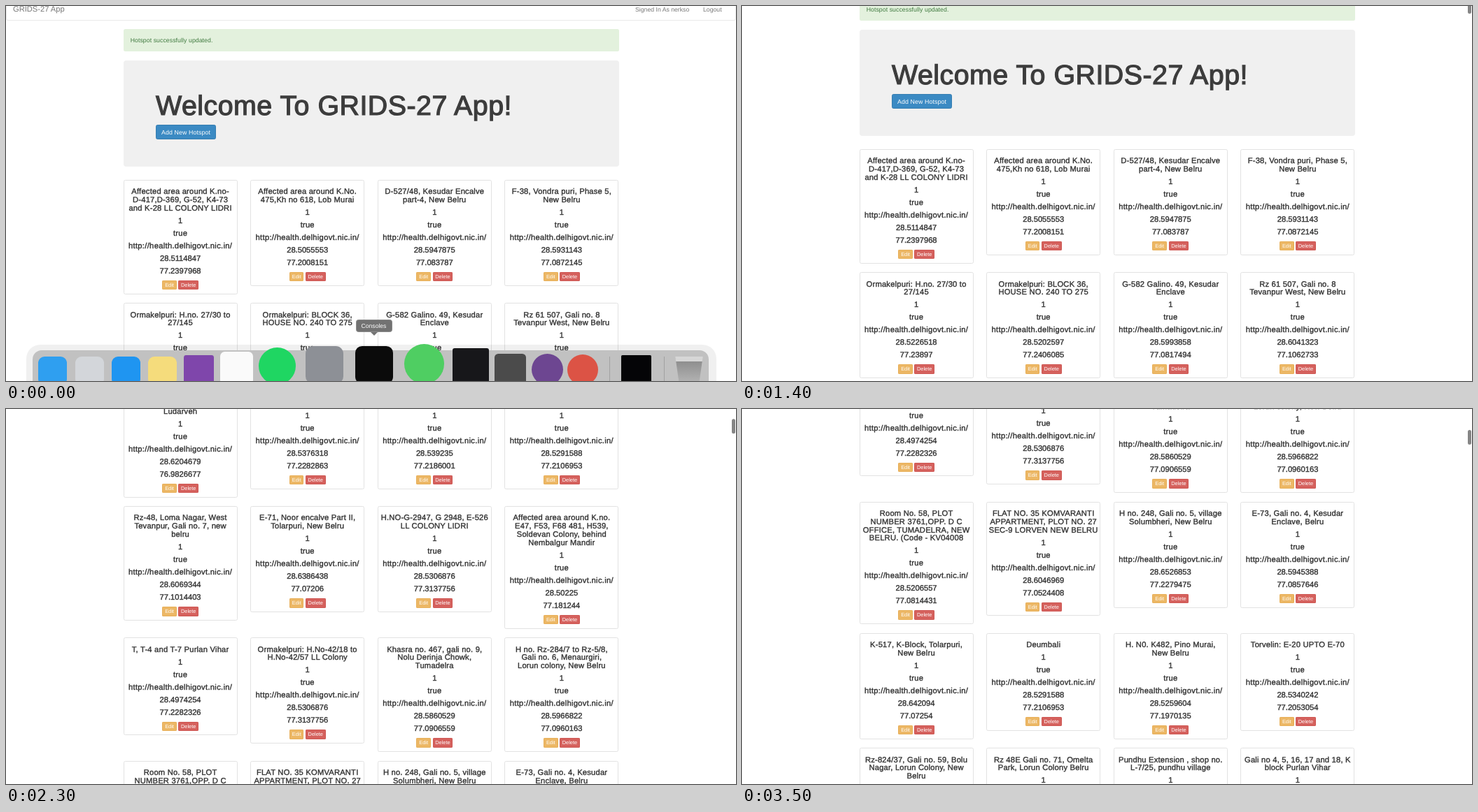
These frames come from a looping animation (1043x537 px, 3.6 s). An HTML page:

```html
<!DOCTYPE html>
<html lang="en">
<head>
<meta charset="utf-8">
<title>Hotspots</title>
<style>
  html, body { margin: 0; width: 100%; height: 100%; overflow: hidden; background: #fff; }
  body { font-family: "Liberation Sans", Arial, sans-serif; text-rendering: geometricPrecision; color: #333; }
  #stage { position: relative; width: 1043px; height: 537px; overflow: hidden; background: #fff; }
  #stage * { box-sizing: border-box; white-space: nowrap; }
  #page { position: absolute; inset: 0; }
  #page > * { position: absolute; }
  .nav { left: 0; top: -12px; width: 1043px; height: 33px; border: 1px solid #e9e9e9; border-radius: 3px; }
  .nav span { position: absolute; top: 10px; line-height: 12px; font-size: 8.7px; color: #777; }
  .nav .brand { left: 9px; font-size: 11.15px; }
  .alert { left: 168px; top: 33px; width: 707.5px; height: 32px; padding-left: 9.7px; border-radius: 2.5px;
    background: #e3f1dd; color: #3f793f; font-size: 8.7px; line-height: 32.5px; letter-spacing: .08px; }
  .hero { left: 168px; top: 78px; width: 707.5px; height: 152px; border-radius: 4px; background: #f0f0f0; }
  .hero h1 { position: absolute; left: 46px; top: 43px; margin: 0; font-size: 39.4px; font-weight: 400; line-height: 45px;
    letter-spacing: .47px; color: #3c3c3c; -webkit-text-stroke: 1.2px; }
  .hero b { position: absolute; left: 46px; top: 91.5px; width: 86px; height: 21.5px; border-radius: 2.5px; border: 1px solid #357db0;
    background: #3b8ac3; color: #fff; font-size: 8.8px; font-weight: 400; line-height: 20px; text-align: center; letter-spacing: .1px; }
  .grid { left: 167.6px; top: 248.8px; display: grid; grid-template-columns: repeat(4, 163px);
    column-gap: 18.6px; row-gap: 12.45px; align-items: start; }
  .card { padding: 11.4px 0 5.4px; border: 1px solid #e2e2e2; border-radius: 2.5px; text-align: center; }
  .card h4 { margin: 0 0 6.15px; font-size: 11.17px; font-weight: 400; line-height: 11.85px;
    letter-spacing: .22px; -webkit-text-stroke: .38px; }
  .card .url { letter-spacing: .32px; }
  .card .num { letter-spacing: 0; }
  .acts { display: flex; justify-content: center; gap: 2.7px; height: 13.5px; }
  .acts span { width: 20.5px; border-radius: 2px; background: #ecb765; box-shadow: inset 0 0 0 .6px #e5a94f;
    color: #fff; font-size: 7.4px; line-height: 13.5px; }
  .acts span + span { width: 28.5px; background: #d5615d; box-shadow: inset 0 0 0 .6px #c94f4b; }
  #thumb { position: absolute; left: 1037px; top: 0; width: 5px; height: 21px; border-radius: 2.5px; background: #858585; }
  #dock { position: absolute; inset: 0; }
  #dock > * { position: absolute; }
  .halo { top: 485px; height: 60px; border-radius: 20px 20px 0 0; background: rgba(0,0,0,.06); }
  .bar { top: 493px; height: 60px; border-radius: 13px 13px 0 0; background: #c1c1c1; }
  .sep { top: 502px; width: 1px; height: 40px; background: #a2a2a2; }
  .bin { clip-path: polygon(2% 0, 98% 0, 84% 100%, 16% 100%); background: linear-gradient(#d6d6d6 18%, #8f8f8f 18%, #b8b8b8); }
  #tip { width: 52px; height: 18px; border-radius: 3.5px; background: #727272; border: 1px solid #8b8b8b;
    color: #fff; font-size: 8.6px; line-height: 16.5px; text-align: center; }
  #tip::after { content: ""; position: absolute; left: 20px; top: 17px; border: 5px solid transparent; border-top-color: #727272; border-bottom: 0; }
</style>
</head>
<body>
<div id="stage">
  <div id="page">
    <div class="nav">
      <span class="brand">GRIDS-27 App</span>
      <span style="left:898px">Signed In As nerkso</span>
      <span style="left:995px">Logout</span>
    </div>
    <div class="alert">Hotspot successfully updated.</div>
    <div class="hero"><h1>Welcome To GRIDS-27 App!</h1><b>Add New Hotspot</b></div>
    <div class="grid"></div>
  </div>
  <div id="thumb"></div>
  <div id="dock"></div>
</div>
<script>
// title lines; latitude; longitude
const places = `
Affected area around K.no-|D-417,D-369, G-52, K4-73|and K-28 LL COLONY LIDRI;28.5114847;77.2397968
Affected area around K.No.|475,Kh no 618, Lob Murai;28.5055553;77.2008151
D-527/48, Kesudar Encalve|part-4, New Belru;28.5947875;77.083787
F-38, Vondra puri, Phase 5,|New Belru;28.5931143;77.0872145
Ormakelpuri: H.no. 27/30 to|27/145;28.5226518;77.23897
Ormakelpuri: BLOCK 36,|HOUSE NO. 240 TO 275;28.5202597;77.2406085
G-582 Galino. 49, Kesudar|Enclave;28.5993858;77.0817494
Rz 61 507, Gali no. 8|Tevanpur West, New Belru;28.6041323;77.1062733
H No. E-4, New Sorva Park,|Ludarveh;28.6204679;76.9826677
Nirup Belru;28.5376318;77.2282863
KOLARTI NAGAR;28.539235;77.2186001
DEUMBALI EXTENDED;28.5291588;77.2106953
Rz-48, Loma Nagar, West|Tevanpur, Gali no. 7, new|belru;28.6069344;77.1014403
E-71, Noor encalve Part II,|Tolarpuri, New Belru;28.6386438;77.07206
H.NO-G-2947, G 2948, E-526|LL COLONY LIDRI;28.5306876;77.3137756
Affected area around K.no.|E47, F53, F68 481, H539,|Soldevan Colony, behind|Nembalgur Mandir;28.50225;77.181244
T, T-4 and T-7 Purlan Vihar;28.4974254;77.2282326
Ormakelpuri: H.No-42/18 to|H.No-42/57 LL Colony;28.5306876;77.3137756
Khasra no. 467, gali no. 9,|Nolu Derinja Chowk,|Tumadelra;28.5860529;77.0906559
H no. Rz-284/7 to Rz-5/8,|Gali no. 6, Menaurgiri,|Lorun colony, New Belru;28.5966822;77.0960163
Room No. 58, PLOT|NUMBER 3761,OPP. D C|OFFICE, TUMADELRA, NEW|BELRU. (Code - KV04008;28.5206557;77.0814431
FLAT NO. 35 KOMVARANTI|APPARTMENT, PLOT NO. 27|SEC-9 LORVEN NEW BELRU;28.6046969;77.0524408
H no. 248, Gali no. 5, village|Solumbheri, New Belru;28.6526853;77.2279475
E-73, Gali no. 4, Kesudar|Enclave, Belru;28.5945388;77.0857646
K-517, K-Block, Tolarpuri,|New Belru;28.642094;77.07254
Deumbali;28.5291588;77.2106953
H. N0. K482, Pino Murai,|New Belru;28.5259604;77.1970135
Torvelin: E-20 UPTO E-70;28.5340242;77.2053054
Rz-824/37, Gali no. 59, Bolu|Nagar, Lorun Colony, New|Belru
Rz 48E Gali no. 71, Omelta|Park, Lorun Colony Belru
Pundhu Extension , shop no.|L-7/25, pundhu village
Gali no 4, 5, 16, 17 and 18, K|block Purlan Vihar`.trim().split("\n");

const row = (text, kind = "") => `<h4 class="${kind}">${text}</h4>`;
document.querySelector(".grid").innerHTML = places.map(place => {
  const [title, lat = "", lng = ""] = place.split(";");
  return `<div class="card">${row(title.replaceAll("|", "<br>"))}${row(1, "num")}${row("true")}` +
    row("http://health.delhigovt.nic.in/", "url") + row(lat, "num") + row(lng, "num") +
    `<div class="acts"><span>Edit</span><span>Delete</span></div></div>`;
}).join("");

const page = document.getElementById("page");
const thumb = document.getElementById("thumb");
const dock = document.getElementById("dock");

function add(kind, text = "") {
  const el = document.createElement("div");
  el.className = kind;
  el.textContent = text;
  dock.append(el);
  return el;
}

const panels = [[add("halo"), 29, 1015], [add("bar"), 38, 1004]];
const seps = [862, 940].map(x => [add("sep"), x]);

// centre x, size, colour, corner radius in percent
const icons = [
  [66.5, 41, "#2f9ff0", 22], [119, 41, "#d3d6da", 22], [171, 41, "#1f95f1", 22],
  [223, 41, "#f5dc7c", 22], [275, 43, "#7f46ab", 8], [329, 47, "#fafafa", 14],
  [387.5, 53, "#1fd662", 50], [455, 54, "#8d9096", 20], [525.5, 54, "#0b0b0b", 18],
  [597, 57, "#4fce62", 50], [663.5, 52, "#17171a", 6], [720, 45, "#4b4b4b", 12],
  [773, 45, "#6d4691", 50], [824, 44, "#dc5345", 50], [900.5, 43, "#050507", 4]
].map(([x, size, color, round]) => {
  const el = add("icon");
  el.style.background = color;
  el.style.borderRadius = round + "%";
  return [el, x, size];
});
icons.push([add("bin"), 976, 41]);

const tip = add("", "Consoles");
tip.id = "tip";

const clamp = v => Math.min(1, Math.max(0, v));

function drawDock(t) {
  const u = clamp((t - 600) / 500);
  const ease = u * u * (3 - 2 * u);
  const drop = 55.6 * ease;
  const relax = clamp(ease / .648);
  const warp = x => x - 25 * Math.tanh((x - 526) / 120) * relax;

  dock.style.display = u < 1 ? "" : "none";
  dock.style.transform = `translateY(${drop}px)`;
  for (const [el, x0, x1] of panels) {
    el.style.left = warp(x0) + "px";
    el.style.width = warp(x1) - warp(x0) + "px";
  }
  for (const [el, x] of seps) el.style.left = warp(x) + "px";
  for (const [el, x, size] of icons) {
    const grow = (size - 41) * (1 - .55 * relax);
    const s = 41 + grow;
    el.style.width = el.style.height = s + "px";
    el.style.left = warp(x) - s / 2 + "px";
    el.style.top = 502 - 1.12 * grow + "px";
  }
  tip.style.left = 499.5 + 2.5 * relax + "px";
  tip.style.top = 449 + 12 * relax + "px";
  tip.style.opacity = 1 - u;
}

// two flicks: the first is slow, the second coasts to a stop
const swipe = [10, 44, 100, 155, 200, 230, 251, 280, 345, 462, 615];
function scrollAt(t) {
  if (t < 1300) return 0;
  return swipe[(t - 1300) / 100] ?? 987 - 372 * Math.pow(.586, (t - 2300) / 100);
}

function draw() {
  const t = Math.floor(performance.now() % 3600 / 100) * 100;
  const y = Math.round(scrollAt(t));
  page.style.transform = `translateY(${-y}px)`;
  thumb.style.display = y ? "" : "none";
  thumb.style.transform = `translateY(${.0427 * y - 12}px)`;
  drawDock(t);
  requestAnimationFrame(draw);
}
draw();
</script>
</body>
</html>
```
